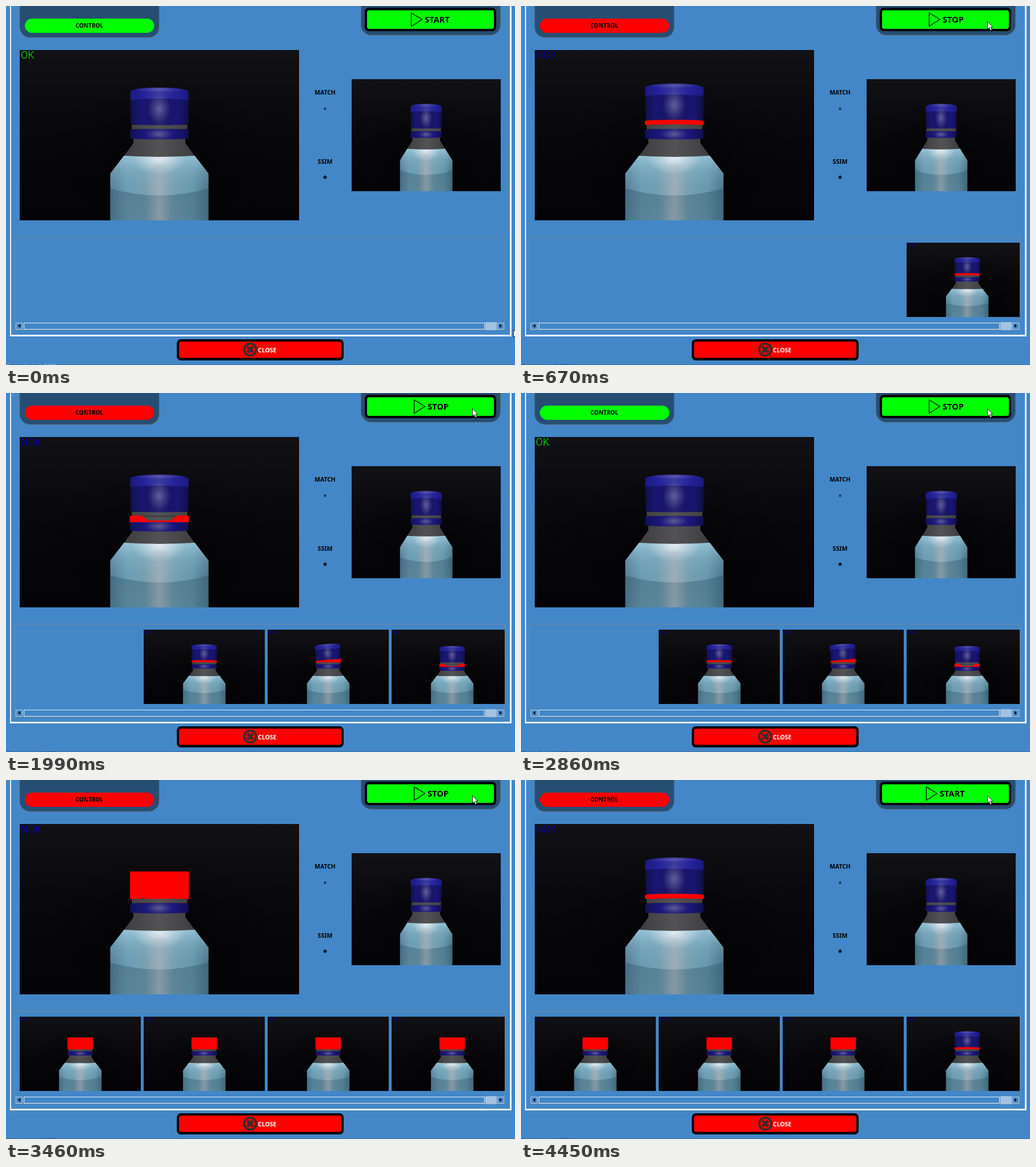
These frames come from a looping animation (891x628 px, 5.11 s). An HTML page with a canvas:

```html
<!DOCTYPE html>
<html>
<head>
<meta charset="utf-8">
<style>
html, body { margin: 0; width: 100%; height: 100%; overflow: hidden; background: #4387c8; }
canvas { display: block; }
</style>
</head>
<body>
<canvas id="stage" width="891" height="628"></canvas>
<script>
const ctx = document.getElementById('stage').getContext('2d');
const LOOP = 5110, BLUE = '#4387c8', RED = '#f00', GREEN = '#0f0', GRAY = '#4b4b4d';

// Start time, bottle in view, list of rejected bottles
const scenes = [
  [0, 'good', []],
  [670, 'raised', ['raised']],
  [1330, 'tilted', ['raised', 'tilted']],
  [1990, 'lowRing', ['raised', 'tilted', 'lowRing']],
  [2600, 'good', ['raised', 'tilted', 'lowRing']],
  [3060, 'noCap', ['raised', 'tilted', 'lowRing', 'noCap']],
  [3460, 'noCap', ['noCap', 'noCap', 'noCap', 'noCap']],
  [3790, 'good', ['noCap', 'noCap', 'noCap', 'noCap']],
  [4450, 'raised', ['noCap', 'noCap', 'noCap', 'raised']]
];
// Start time, pointer tip
const pointer = [
  [0, 888, 566], [70, 880, 440], [153, 858, 250], [237, 832, 90], [320, 816, 27],
  [3855, 816, 19], [3920, 816, 27]
];

const at = (list, t) => list.filter(row => row[0] <= t).pop();

function rect(x, y, w, h, fill) {
  ctx.fillStyle = fill;
  ctx.fillRect(x, y, w, h);
}

function round(x, y, w, h, r, fill, line) {
  ctx.beginPath();
  ctx.roundRect(x, y, w, h, r);
  ctx.fillStyle = fill;
  ctx.fill();
  if (line) {
    ctx.strokeStyle = line;
    ctx.lineWidth = 1;
    ctx.stroke();
  }
}

function frame(x, y, w, h, color, width = 1) {
  ctx.strokeStyle = color;
  ctx.lineWidth = width;
  ctx.strokeRect(x, y, w, h);
}

function shape(path, fill, line, width = 1) {
  const p = new Path2D(path);
  if (fill) { ctx.fillStyle = fill; ctx.fill(p); }
  if (line) { ctx.strokeStyle = line; ctx.lineWidth = width; ctx.stroke(p); }
}

function text(s, x, y, size, color = '#000', align = 'center', face = 'bold', family = '"Noto Sans", "Open Sans"') {
  ctx.font = `${face} ${size}px ${family}, sans-serif`;
  ctx.textAlign = align;
  ctx.fillStyle = color;
  ctx.fillText(s, x, y);
}

function fade(g, ...colors) {
  colors.forEach((c, i) => g.addColorStop(i / (colors.length - 1), c));
  return g;
}
const across = (x0, x1, ...c) => fade(ctx.createLinearGradient(x0, 0, x1, 0), ...c);
const down = (y0, y1, ...c) => fade(ctx.createLinearGradient(0, y0, 0, y1), ...c);

function glow(x, y, rx, ry, rgb, alpha) {
  ctx.save();
  ctx.translate(x, y);
  ctx.scale(rx, ry);
  const g = fade(ctx.createRadialGradient(0, 0, 0, 0, 0, 1), `rgba(${rgb},${alpha})`, `rgba(${rgb},${alpha * .45})`, `rgba(${rgb},0)`);
  rect(-1, -1, 2, 2, g);
  ctx.restore();
}

function drawCap(pose) {
  ctx.save();
  if (pose === 'raised') ctx.translate(0, -7);
  if (pose === 'tilted') {
    ctx.translate(244.5, 122.5);
    ctx.rotate(-.06);
    ctx.translate(-244.5, -131);
  }
  shape('M193.5 73Q195 66.5 244.5 66Q294 66.5 295.5 73V130Q244.5 133 194.5 130Z',
    across(193, 296, '#11104a', '#191672', '#19156a', '#27246f', '#19156a', '#191672', '#100f46'));
  shape('M193.5 73Q195 66.5 244.5 66Q294 66.5 295.5 73V87Q244.5 83 193.5 87Z',
    across(193, 296, '#1c1a80', '#25239a', '#3d3b9e', '#25239a', '#1c1a80'));
  glow(244, 69, 44, 5, '125,122,195', .45);
  glow(244, 103, 21, 25, '145,140,190', .55);
  ctx.restore();
}

function drawBottle(pose) {
  // gray neck and shoulder
  shape('M196 131Q244 129 294 131L293 138L290 140V163L307 186V190H182V186L199 163V140L196 138Z',
    across(182, 307, '#3c3c3e', '#48484a', '#535355', '#48484a', '#3c3c3e'));
  shape('M198 138.5H292', null, '#29292d', 1);

  // liquid
  const body = new Path2D('M182.5 185Q244.5 189 306.5 185L330.5 216V298H158.5V216Z');
  ctx.save();
  ctx.clip(body);
  rect(158, 180, 174, 120, across(158, 331, '#557f93', '#6b9db3', '#749fb2', '#92a8b4', '#749fb2', '#6798ad', '#4c768a'));
  rect(158, 180, 174, 70, down(183, 245, 'rgba(170,212,230,.7)', 'rgba(150,195,215,.25)', 'rgba(130,175,195,0)'));
  shape('M158 242Q244.5 267 331 242V299H158Z', down(242, 299, 'rgba(38,74,96,.34)', 'rgba(40,76,95,.3)'));
  glow(244.5, 188, 48, 30, '240,243,247', .85);
  rect(222, 200, 45, 98, across(222, 267, 'rgba(175,182,188,0)', 'rgba(175,182,188,.33)', 'rgba(175,182,188,0)'));
  ctx.restore();

  // blue ring
  ctx.save();
  if (pose === 'lowRing') ctx.translate(0, 9);
  shape('M193.5 139Q244.5 137 295.5 139V155Q244.5 158 193.5 155Z',
    across(193, 296, '#131159', '#1b177c', '#2b2878', '#1b177c', '#110f50'));
  glow(244, 147, 24, 9, '145,140,185', .5);
  ctx.restore();

  if (pose !== 'noCap') drawCap(pose);
}

const marks = {
  raised: 'M193 124Q198 122 244.5 122Q291 122 296 124V131H285Q244 129 204 131H193Z',
  tilted: 'M193 126Q225 121 260 119Q282 117 296 117.5V131H280Q240 129 202 131H193Z',
  lowRing: 'M193 138L204 137L215 138L224 146H264L274 138L284 137L296 138V149H193Z',
  noCap: 'M193 83H296V131H276L270 130L262 131H225L216 130L207 131H193Z'
};

// A camera picture is 489 by 298 units, fitted into the given box
function drawPicture(x, y, w, h, pose, label = true) {
  ctx.save();
  ctx.beginPath();
  ctx.rect(x, y, w, h);
  ctx.clip();
  ctx.translate(x, y);
  ctx.scale(w / 489, h / 298);
  rect(0, 0, 489, 298, down(0, 298, '#121115', '#0b0a0d', '#060508', '#040306'));
  glow(244, 190, 220, 140, '0,0,0', .5);
  drawBottle(pose);
  if (marks[pose]) shape(marks[pose], RED);
  if (label) {
    const ok = pose === 'good';
    text(ok ? 'OK' : 'NOK', 2, 15, 18, ok ? GREEN : '#0000d8', 'left', '300', 'Roboto');
  }
  ctx.restore();
}

function drawScrollbar() {
  frame(15.5, 404.5, 858, 162, '#6f8798');
  for (const [x, tip] of [[17, -1], [860, 1]]) {
    frame(x + .5, 554.5, 11, 11, '#b9d0e6');
    const c = x + 6;
    shape(`M${c + 2 * tip} 559.5L${c - 2 * tip} 556.5V562.5Z`, '#000');
  }
  frame(31.5, 554.5, 806, 11, '#e4eef7');
  rect(839, 553, 20, 14, '#a3c2e2');
}

function drawClose() {
  round(299, 583, 292, 37, 7, '#000');
  round(303, 587, 284, 28.5, 4, RED);
  ctx.beginPath();
  ctx.arc(427.5, 601, 10.5, 0, 7);
  ctx.strokeStyle = '#332b2b';
  ctx.lineWidth = 3.5;
  ctx.stroke();
  shape('M422.5 596L432.5 606M432.5 596L422.5 606', null, '#332b2b', 4.5);
  text('CLOSE', 441, 606, 10.5, '#fff', 'left');
}

function drawStart(running) {
  round(628, 3, 230, 41, 7, '#000');
  round(632, 7.5, 222, 32.5, 4, GREEN);
  const x = running ? 714.5 : 709.5;
  shape(`M${x} 12V35.5L${x + 19} 23.5Z`, null, '#000', 1.2);
  text(running ? 'STOP' : 'START', x + 23.5, 29, 14.6, '#000', 'left');
}

function draw(t) {
  const [, pose, rejects] = at(scenes, t);
  rect(0, 0, 891, 628, BLUE);

  // window edges
  rect(7, 0, 2, 577, '#eaf2fa');
  rect(882, 0, 3, 577, '#eaf2fa');
  rect(7, 575, 878, 3, '#eaf2fa');
  rect(0, 627, 891, 1, '#386fa5');
  text('Control result 0001', 0, 634, 10, t < 70 ? '#9fc0e0' : '#2d5f92', 'left', '400');

  round(24, -30, 244, 85, 18, '#264e73', '#5b6570');
  round(621.5, -30, 244, 81, 18, '#264e73', '#5b6570');
  round(33, 22, 226.5, 25, 12.5, pose === 'good' ? GREEN : RED);
  text('CONTROL', 146, 38, 10);
  drawStart(t >= 320 && t < 4450);

  drawPicture(24, 77, 489, 298, pose);
  drawPicture(605, 128, 261, 196, 'good', false);
  text('MATCH', 558.5, 155, 10.3);
  text('*', 558.5, 185, 10, '#000', 'center', '400');
  text('SSIM', 558.5, 276, 10.6);
  text('*', 558.5, 307, 14);

  drawScrollbar();
  ctx.save();
  ctx.beginPath();
  ctx.rect(16, 405, 857, 148);
  ctx.clip();
  rejects.forEach((p, i) => drawPicture(24 + 217 * (4 - rejects.length + i), 414, 212, 130, p));
  ctx.restore();
  drawClose();

  const [, px, py] = at(pointer, t);
  ctx.save();
  ctx.translate(px + .5, py + .5);
  shape('M0 0V13L3 10.2L5.2 15.5L7.6 14.4L5.4 9.4H9.4Z', '#fff', '#111', .9);
  ctx.restore();
}

function tick() {
  draw(performance.now() % LOOP);
  requestAnimationFrame(tick);
}
tick();
</script>
</body>
</html>
```
